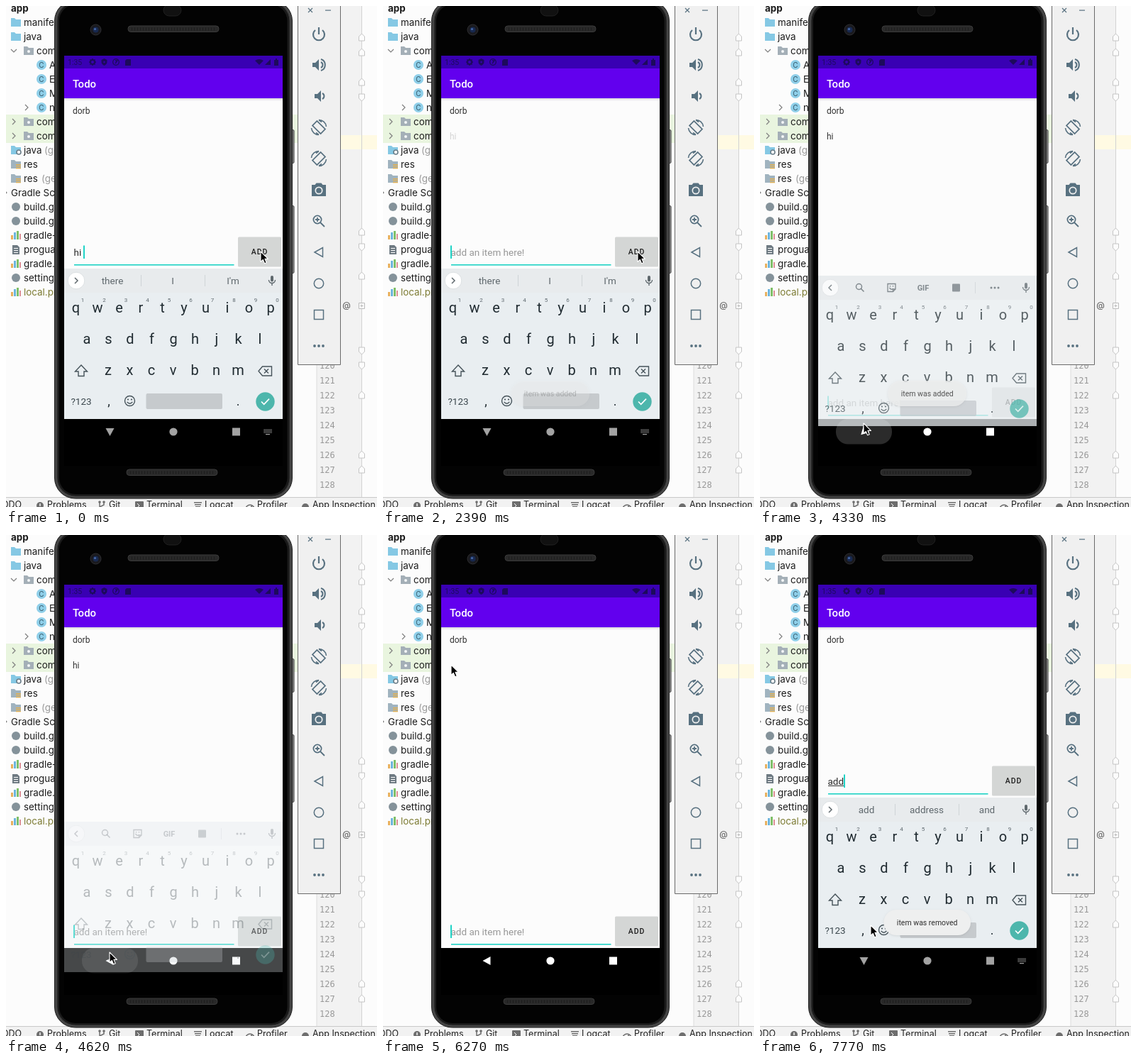
An HTML page with a canvas for the animation above (8000 ms loop, 523 px wide and 706 px high).

```html
<!DOCTYPE html>
<html lang="en">
<head>
<meta charset="utf-8">
<title>Todo app demo</title>
<style>
html, body { margin: 0; width: 100%; height: 100%; overflow: hidden; background: #fff; }
canvas { display: block; width: 523px; height: 706px; }
</style>
</head>
<body>
<canvas id="stage"></canvas>
<script>
const W = 523, H = 706, LOOP = 8000;
const canvas = document.getElementById('stage');
const dpr = window.devicePixelRatio || 1;
canvas.width = W * dpr;
canvas.height = H * dpr;
const c = canvas.getContext('2d');

const ROBOTO = 'Roboto, sans-serif', INTER = 'Inter, sans-serif', MONO = '"DejaVu Sans Mono", monospace';
const TEAL = '#1fd3c6', SLATE = '#587180', GREY = '#5f686d';

// ---------- helpers ----------
function rect(x, y, w, h, fill) { c.fillStyle = fill; c.fillRect(x, y, w, h); }
function round(x, y, w, h, r, fill, stroke, lw = 1) {
  c.beginPath(); c.roundRect(x, y, w, h, r); paint(fill, stroke, lw);
}
function disc(x, y, r, fill, stroke, lw = 1) {
  c.beginPath(); c.arc(x, y, r, 0, 7); paint(fill, stroke, lw);
}
function paint(fill, stroke, lw) {
  if (fill) { c.fillStyle = fill; c.fill(); }
  if (stroke) { c.strokeStyle = stroke; c.lineWidth = lw; c.stroke(); }
}
function shape(d, x, y, fill, stroke, lw = 1, turn = 0, flip = 1) {
  c.save(); c.translate(x, y); c.scale(flip, 1); c.rotate(turn);
  const p = new Path2D(d);
  if (fill) { c.fillStyle = fill; c.fill(p); }
  if (stroke) { c.strokeStyle = stroke; c.lineWidth = lw; c.stroke(p); }
  c.restore();
}
function text(s, x, y, size, font, fill, align = 'left', weight = 400) {
  c.font = `${weight} ${size}px ${font}`;
  c.textAlign = align; c.fillStyle = fill;
  c.fillText(s, x, y);
}
function faded(alpha, draw) {
  if (alpha <= 0) return;
  c.save(); c.globalAlpha *= alpha; draw(); c.restore();
}
const within = (t, spans) => spans.some(([a, b]) => t >= a && t < b);

// Piecewise linear track of [time, ...values]
function track(t, keys) {
  let i = 0;
  while (i < keys.length - 1 && keys[i + 1][0] <= t) i++;
  const a = keys[i], b = keys[i + 1] || a;
  const k = b === a ? 0 : (t - a[0]) / (b[0] - a[0]);
  return a.slice(1).map((v, j) => v + (b[j + 1] - v) * k);
}

function tick(t) {
  const base = [4920, 3130, 2090, 0].find(b => t >= b);
  return base + Math.floor((t - base) / 150) * 150;
}

// ---------- IDE ----------
function folder(x, y, fill, dot) {
  shape('M-7-6H-2L0-4H7V6H-7Z', x, y, fill);
  if (dot) disc(x, y + 1, 2, '#f4f6f7');
}
function chevron(x, y, turn) { shape('M-2-4L2 0L-2 4', x, y, null, '#7f7f7f', 1.2, turn); }
function chart(x, y) {
  rect(x - 7, y, 3, 6, '#e8b15f'); rect(x - 3, y - 4, 3, 10, '#6cb5dc');
  rect(x + 1, y - 6, 3, 12, '#7fbf68'); rect(x + 5, y - 2, 2, 8, '#dd8f97');
}

function drawTree() {
  rect(0, 153, 411, 40, '#e9f5df');
  const label = (s, x, y, fill = '#1c1c1c', weight = 400) => text(s, x, y + 5, 13.4, INTER, fill, 'left', weight);
  label('app', 7, 3, '#1c1c1c', 700);
  folder(14, 23, '#85c8e4'); label('manifests', 25, 23);
  folder(14, 43, '#85c8e4'); label('java', 25, 43);
  chevron(11, 63, Math.PI / 2);
  [63, 163, 183].forEach(y => { folder(32, y, '#a4afb7', true); label('com', 43, y); });
  ['A', 'E', 'M', 'n'].forEach((s, i) => {
    const y = 83 + i * 20;
    disc(50, y, 7, '#8fcfe9');
    text('C', 50, y + 4, 10, INTER, '#35596a', 'center');
    label(s, 61, y);
  });
  chevron(29, 143, 0); chevron(11, 163, 0); chevron(11, 183, 0);
  folder(14, 203, '#85c8e4');
  disc(18, 206, 3, '#fff', '#6b7d88', 1.6);
  label('java', 25, 203); label('(gen', 54, 203, '#999');
  [223, 243].forEach(y => {
    folder(14, y, '#a0b3bf');
    for (let i = 0; i < 3; i++) rect(14, y + i * 2.5, 7, 1.3, '#e5b04c');
    label('res', 25, y);
  });
  label('(gen', 50, 243, '#999');
  chevron(-1, 263, 0); label('Gradle Scripts', 7, 263);
  [283, 303, 383].forEach(y => disc(14, y, 6, '#84929a'));
  [323, 363, 403].forEach(y => chart(14, y));
  shape('M-5-6H2L5-3V7H-5Z', 14, 343, '#6e7a82');
  for (let i = 0; i < 3; i++) rect(11, 341 + i * 3, 6, 1, '#fff');
  ['build.gradle', 'build.gradle', 'gradle-wrapper', 'proguard', 'gradle.prop', 'settings', 'local.prop']
    .forEach((s, i) => label(s, 25, 283 + i * 20, i === 6 ? '#7c7b32' : '#1c1c1c'));
}

function drawEditor() {
  rect(438, 0, 63, 692, '#f2f2f2');
  rect(438, 182, 85, 20, '#fffae3');
  rect(437.5, 0, 1, 692, '#dcdcdc');
  rect(501, 0, 1, 692, '#d2d2d2');
  for (let n = 120; n <= 128; n++) text(n, 442, 511 + (n - 120) * 21, 12, MONO, '#999');
  text('@', 480, 426, 12, INTER, '#555', 'center');
  const fold = 'M-4 5V-1L0-5L4-1V5Z';
  [44, 65, 107, 318, 380, 548, 632, 653].forEach(y => shape(fold, 501.5, y, '#fcfcfc', '#c4c4c4'));
  [129, 340, 486, 507].forEach(y => shape(fold, 501.5, y, '#fcfcfc', '#c4c4c4', 1, Math.PI));
  shape('M-4-4H4V4H-4ZM-2 0H2M0-2V2', 501.5, 422.5, '#fcfcfc', '#bbb');
}

function drawToolbar() {
  rect(0, 692, W, 14, '#f2f2f2');
  rect(0, 692, W, 1, '#c9c9c9');
  const tabs = [['ODO', -6], ['Problems', 58], ['Git', 145], ['Terminal', 198], ['Logcat', 280], ['Profiler', 354], ['App Inspection', 432]];
  tabs.forEach(([s, x]) => text(s, x, 707, 12.5, INTER, '#222'));
  disc(48, 704, 5, '#6e6e6e'); rect(47.3, 701, 1.4, 4, '#fff');
  shape('M-3-4V6M3-3V0L-3 3', 135, 703, null, '#6e6e6e', 1.5);
  disc(132, 699, 1.8, '#6e6e6e'); disc(138, 699, 1.8, '#6e6e6e');
  round(182, 698, 12, 12, 1, '#6e6e6e');
  shape('M-3-2L0 1L-3 4', 188, 703, null, '#fff');
  for (let i = 0; i < 3; i++) rect(265 + i, 699 + i * 3, 11 - i * 2, 1.5, '#6e6e6e');
  shape('M-6 5A6 6 0 0 1 6 5M0 4L3 0', 344, 704, null, '#6e6e6e', 1.6);
  shape('M-5 4A5 5 0 0 1 5 4Z', 422, 702, '#6e6e6e');
}

function drawControls() {
  round(411.5, -5, 60, 510.5, 0, '#f0f0f0', '#6a6a6a');
  shape('M-3-3L3 3M3-3L-3 3', 429, 6, null, SLATE, 1.2);
  rect(450, 5.5, 8, 1.2, SLATE);
  const x = 441;
  const line = (d, y, lw = 2, turn = 0, flip = 1) => shape(d, x, y, null, SLATE, lw, turn, flip);
  line('M-5-6A8 8 0 1 0 5-6M0-10V0', 40, 2.2);
  shape('M-9-3H-5L0-8V8L-5 3H-9Z', x, 83, SLATE);
  line('M3-4A4.5 4.5 0 0 1 3 4M3-8A8.4 8.4 0 0 1 3 8', 83);
  shape('M-6-3H-2L3-8V8L-2 3H-6Z', x, 127, SLATE);
  line('M5-4A4.5 4.5 0 0 1 5 4', 127);
  [[171, 1], [215, -1]].forEach(([y, flip]) => {
    line('M-4.5-8.2H4.5V8.2H-4.5Z', y, 1.7, -Math.PI / 4, flip);
    line('M0-10.5A10.5 10.5 0 0 1 10.5-1M0-10.5L4-7.5M0 10.5A10.5 10.5 0 0 1-10.5 1M0 10.5L-4 7.5', y, 1.6, 0, flip);
  });
  shape('M-10-7H-5.5L-3.5-9.5H3.5L5.5-7H10V9H-10Z', x, 259, SLATE);
  disc(x, 260, 4.7, null, '#f0f0f0', 1.7);
  disc(439, 301, 5.6, null, SLATE, 1.8);
  line('M2 2L8 8M-5-2H1M-2-5V1', 303, 1.8);
  line('M-6 0L5.5-6.5V6.5Z', 347, 1.5);
  disc(x, 391, 6.7, null, SLATE, 1.5);
  round(434.5, 428.5, 13, 13, 0, null, SLATE, 1.5);
  [-6, 0, 6].forEach(d => disc(x + d, 479, 1.9, SLATE));
}

// ---------- phone ----------
function drawPhone() {
  [[174, 48], [281, 96]].forEach(([y, h]) => round(400.5, y + 0.5, 5.5, h - 1, 1.5, '#8b8b8b', '#3a3a3a'));
  round(68.5, -8, 335, 702, 29, '#464646', '#1d1d1d');
  round(72, -5, 328, 696, 26, '#1a1a1a', '#3d3d3d');
  round(75, -2, 321.5, 690, 23, '#030303');
  round(222, -2, 25, 16, 8, '#111', '#202020');
  disc(126.5, 33.5, 7.5, '#1a1a1e', '#303033');
  disc(126.5, 33.5, 4, '#18294f');
  disc(125.5, 32.5, 1.6, '#486aa8');
  [[172, 28], [170, 653]].forEach(([x, y]) => {
    round(x, y, 128, 8.5, 4, '#292929', '#3b3b3b');
    for (let i = 0; i < 30; i++) rect(x + 5 + i * 4, y + 2.5, 1, 4, '#1c1c1c');
  });
}

function drawStatus() {
  rect(82, 70, 308, 512, '#fcfcfc');
  rect(82, 70, 308, 18, '#3900b3');
  rect(82, 88, 308, 42, '#6200ee');
  const shade = c.createLinearGradient(0, 130, 0, 134);
  shade.addColorStop(0, '#dadada'); shade.addColorStop(1, '#fcfcfc');
  rect(82, 130, 308, 4, shade);
  const ink = '#1d0a5c';
  text('1:35', 87, 83, 10.5, ROBOTO, ink);
  disc(122, 79, 3, null, ink, 2);
  for (let i = 0; i < 8; i++) shape('M3.5 0H5', 122, 79, null, ink, 1.6, i * Math.PI / 4);
  shape('M0-5L4-3V0Q4 3 0 5Q-4 3-4 0V-3Z', 138.5, 79, ink);
  disc(138.5, 79, 1.2, '#3900b3');
  disc(155, 79, 4.3, null, ink, 1.3); shape('M-1-2H2L-1 2', 155, 79, null, ink, 1.3);
  shape('M-2-4H4V5H-4V-2Z', 172, 79, ink);
  shape('M0 4L-6-2Q0-6 6-2Z', 357, 79, ink);
  shape('M4-4V4H-4Z', 369, 79, ink);
  shape('M-3-3H-1V-5H1V-3H3V5H-3Z', 381, 79, ink);
  text('Todo', 94, 115, 15, ROBOTO, '#fff', 'left', 500);
}

function drawNav(s) {
  rect(82, 582, 308, 66, '#000');
  faded(s.ripple, () => round(107, 582, 79, 35.5, 17, '#2b2b2b'));
  const ink = s.raised ? '#a3a3a3' : '#fff';
  shape('M-6 0L5-6V6Z', 146.5, 600, ink, null, 1, -s.navTurn * Math.PI / 2);
  disc(236, 600, 5.6, ink);
  rect(319, 594.5, 11, 11, ink);
  if (s.raised) {
    for (let r = 0; r < 3; r++) for (let i = 0; i < 6; i++) rect(363.5 + i * 2, 596.5 + r * 2, 1.2, 1.2, ink);
    rect(366, 603, 6, 1.2, ink);
  }
}

function drawRow(s) {
  const y = s.raised ? 0 : 212;
  if (s.typed) text(s.typed, 95.5, y + 352, 13.5, ROBOTO, '#2b2b2b');
  else text('add an item here!', 95.5, y + 352, 13.5, ROBOTO, '#979797');
  c.font = '13.5px ' + ROBOTO;
  const w = c.measureText(s.typed).width;
  if (s.composing) rect(96, y + 353, w, 1, '#333');
  if (s.caret) rect(Math.round(95 + w), y + 337.5, 2, 18.5, TEAL);
  rect(96, y + 364, 225.5, 1.6, TEAL);
  round(327, y + 325.5, 61, 42, 1.5, s.pressed ? '#c3c5c4' : '#d4d6d5');
  c.letterSpacing = '0.9px';
  text('ADD', 357.5, y + 350, 10.5, ROBOTO, '#1c1c1c', 'center', 500);
  c.letterSpacing = '0px';
}

// ---------- keyboard ----------
function mic(x, y) {
  round(x - 2, y - 7, 4, 8.5, 2, GREY);
  shape('M-4.5-1A4.5 4.5 0 0 0 4.5-1M0 3.5V7', x, y, null, GREY, 1.4);
}

function drawStrip(words) {
  rect(82, 370, 308, 34, '#e8ebed');
  disc(99, 387, 11.8, '#fff', '#dde1e3');
  shape('M-2-4L2 0L-2 4', 99, 387, null, GREY, 1.5, words ? 0 : Math.PI);
  mic(375, 387);
  if (words) {
    words.forEach((w, i) => text(w, 150 + i * 85, 392, 13.5, ROBOTO, GREY, 'center'));
    rect(190, 379, 1, 16, '#cfd4d7'); rect(280, 379, 1, 16, '#cfd4d7');
    return;
  }
  disc(139.5, 385.5, 4, null, GREY, 1.5);
  shape('M2 2L6.5 6.5', 140, 386, null, GREY, 1.6);
  shape('M-5.5-5.5H5.5V2L2 5.5H-5.5ZM2 5.5V2H5.5M-3 0Q0 4 2 1M-2-3V-1.5M2-3V-1.5', 185.5, 387, null, GREY, 1.3);
  text('GIF', 230, 391, 11, ROBOTO, GREY, 'center', 700);
  round(271, 381.5, 11, 11, 1, '#727a7f');
  rect(303, 379, 1, 16, '#cfd4d7');
  [-5, 0, 5].forEach(d => disc(331 + d, 387, 1.5, GREY));
}

function drawKeyboard(words) {
  rect(82, 370, 308, 212, '#e9eef1');
  drawStrip(words);
  const ink = '#202b31';
  [['qwertyuiop', 98.5], ['asdfghjkl', 114], ['zxcvbnm', 144]].forEach(([keys, x], row) =>
    [...keys].forEach((k, i) => text(k, x + i * 30.5, 432 + row * 44, 20, ROBOTO, ink, 'center')));
  [...'1234567890'].forEach((n, i) => text(n, 108 + i * 30.5, 417, 8, ROBOTO, '#5d676d', 'center'));
  shape('M0-8L8.5 1H4V7.5H-4V1H-8.5Z', 106, 514, null, '#46535a', 1.4);
  shape('M-9.5 0L-4-6.5H9V6.5H-4ZM-1.5-3L4.5 3M4.5-3L-1.5 3', 365.5, 514.5, null, '#46535a', 1.4);
  text('?123', 106, 562, 13.5, ROBOTO, '#3b474d', 'center');
  text(',', 145, 563, 18, ROBOTO, ink, 'center');
  text('.', 327, 563, 18, ROBOTO, ink, 'center');
  disc(174.5, 556.5, 7, null, '#46535a', 1.4);
  shape('M-3.8 1.5Q0 6 3.8 1.5', 174.5, 556.5, null, '#46535a', 1.3);
  disc(172, 554.5, 1.1, '#46535a'); disc(177, 554.5, 1.1, '#46535a');
  round(197.5, 546, 107.5, 22, 2, '#c6cacd');
  disc(365.5, 557.5, 13.2, '#4db6ac');
  shape('M-5.5 0L-1.8 3.8L5.5-3.8', 365.5, 557.5, null, '#fff', 1.7);
}

function drawToast(message, alpha) {
  faded(alpha, () => {
    c.font = '10.5px ' + ROBOTO;
    const w = c.measureText(message).width + 37;
    c.save();
    c.shadowColor = 'rgba(0,0,0,.09)'; c.shadowBlur = 3 * dpr; c.shadowOffsetY = dpr;
    round(235.7 - w / 2, 528, w, 36, 18, '#eeefef');
    c.restore();
    text(message, 235.7, 550, 10.5, ROBOTO, '#2e2e2e', 'center');
  });
}

function drawPointer(x, y) {
  c.lineJoin = 'round';
  shape('M0 0V14.5L3.3 11.4L5.6 16.8L8.2 15.7L5.9 10.4H10.4Z', x, y, '#000', '#fff', 1.1);
  c.lineJoin = 'miter';
}

// ---------- timeline ----------
const POINTER = [
  [0, 359, 346], [1050, 359, 346], [1200, 359, 347], [1350, 359, 346], [2540, 359, 346],
  [2690, 330, 430], [2840, 250, 575], [2990, 195, 621], [3130, 181, 626], [3280, 178, 624],
  [3430, 163, 606], [3580, 154, 599], [3730, 154, 599], [3880, 150, 595], [4030, 146, 588],
  [4480, 146, 588], [4630, 135, 510], [4780, 106, 300], [4920, 90, 194], [5070, 88, 187],
  [5220, 92, 184], [5370, 96, 183], [6270, 96, 183], [6420, 108, 280], [6570, 138, 470],
  [6720, 155, 580], [6870, 158, 562], [7020, 156, 550]
];
const CARET = [[0, 300], [900, 1350], [1800, 2840], [3280, 3580], [4030, 4630], [5220, 5670], [6120, 6570], [7320, LOOP]];
const KEYS_DROP = [[0, 0, 1], [4180, 0, 1], [4330, 10, 0.74], [4480, 34, 0.3], [4630, 60, 0], [7020, 40, 0], [7170, 14, 0.6], [7320, 0, 1]];

function stateAt(t) {
  const raised = t < 4180 || t >= 7320;
  const typed = t < 2240 ? 'hi ' : t < 7470 ? '' : 'add'.slice(0, Math.floor((t - 7470) / 150) + 1);
  let words = null;
  if (t < 2690) words = ['there', 'I', "I'm"];
  else if (t >= 7770) words = ['add', 'address', 'and'];
  const [drop, keys] = track(t, KEYS_DROP);
  return {
    raised, typed, words, drop, keys,
    composing: t >= 7470,
    caret: within(t, CARET),
    pressed: within(t, [[2090, 2390]]),
    item: t < 6270 ? track(t, [[0, 0], [2240, 0], [2390, 0.2], [2540, 1]])[0] : 0,
    added: track(t, [[0, 0], [2240, 0], [2390, 0.25], [2540, 1], [4180, 1], [4330, 0.8], [4480, 0]])[0],
    removed: track(t, [[0, 0], [6270, 0], [6420, 0.5], [6570, 1]])[0],
    ripple: track(t, [[0, 0], [3880, 0], [4030, 0.8], [4330, 1], [4480, 0.6], [4780, 0]])[0],
    navTurn: track(t, [[0, 1], [4180, 1], [4480, 0], [7170, 0], [7320, 1]])[0]
  };
}

function draw(t) {
  c.setTransform(dpr, 0, 0, dpr, 0, 0);
  rect(0, 0, W, H, '#fcfcfc');
  drawTree();
  drawEditor();
  drawToolbar();
  drawControls();
  drawPhone();

  const s = stateAt(t);
  drawStatus();
  text('dorb', 94, 152, 12, ROBOTO, '#303030');
  faded(s.item, () => text('hi', 94, 188, 12, ROBOTO, '#303030'));
  drawRow(s);
  drawNav(s);
  faded(s.keys, () => {
    c.translate(0, s.drop);
    drawKeyboard(s.words);
  });
  drawToast('item was added', s.added);
  drawToast('item was removed', s.removed);
  drawPointer(...track(t, POINTER));
}

const start = performance.now();
function frame() {
  draw(tick((performance.now() - start) % LOOP));
  requestAnimationFrame(frame);
}
frame();
</script>
</body>
</html>
```
